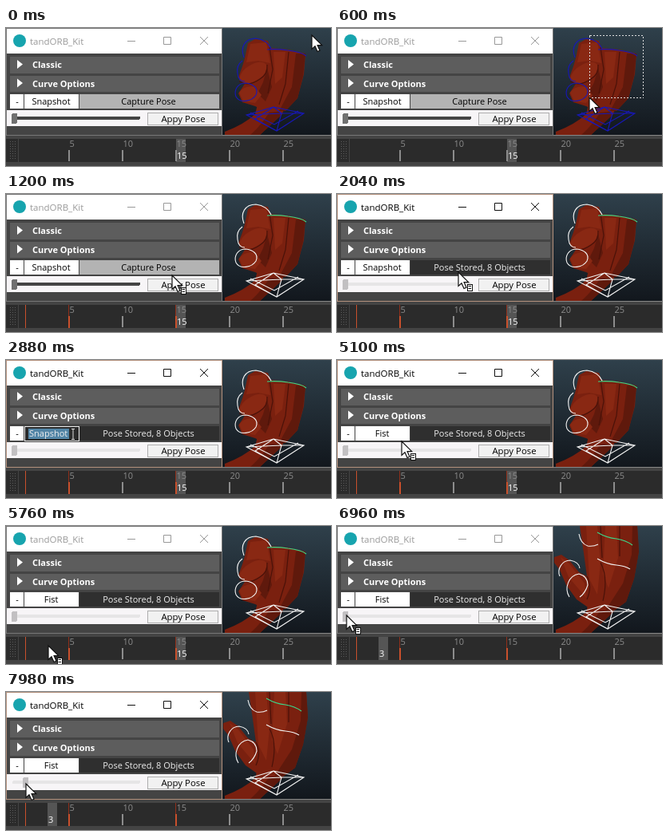
An HTML page that plays this animation: 407x173 px, repeating every 8 s.

```html
<!DOCTYPE html>
<html lang="en">
<head>
<meta charset="utf-8">
<style>
html, body { margin: 0; width: 100%; height: 100%; overflow: hidden; background: #444; }
svg { display: block; width: 407px; height: 173px; font: 11px "Open Sans", sans-serif; }
rect { shape-rendering: crispEdges; }
.mid { text-anchor: middle; }
.rig { fill: none; stroke: #1717b8; stroke-width: 1.1; }
.selected .rig { stroke: #f2f2f2; }
.selected .lead { stroke: #3ad88a; }
.skin { fill: #7a200f; }
.lit { fill: #892813; }
.shade { fill: #5f190c; }
.crease { fill: none; stroke: #4a1209; stroke-width: 1.2; }
</style>
</head>
<body>
<svg viewBox="0 0 407 173">
  <defs>
    <linearGradient id="sky" x2="0" y2="1"><stop stop-color="#2f404b"/><stop offset="1" stop-color="#12171d"/></linearGradient>
    <clipPath id="view"><rect x="271" width="136" height="134"/></clipPath>
  </defs>
  <rect width="407" height="173" fill="#444"/>
  <rect x="271" y="134" width="136" height="1" fill="#888"/>

  <g id="scene" clip-path="url(#view)">
    <rect x="271" width="136" height="134" fill="url(#sky)"/>
    <path class="skin" d="M316 92L312 108Q298 121 274 130V134H318L346 108L350 94Z"/>
    <path class="shade" d="M334 98L346 108L318 134H306Q324 118 334 98Z"/>
    <g id="fist">
      <path class="skin" d="M299 38L303 19L312 14L328 16L331 25L353 27L375 32L373 58L365 88L350 104L328 106L312 98L296 93L291 82L299 70L291 62L296 48Z"/>
      <path class="lit" d="M306 20L326 18L331 44L316 41L301 43ZM335 30L350 30L346 62L337 70Z"/>
      <path class="shade" d="M363 32L375 32L372 60L365 88L350 104L342 104L358 74ZM327 50L333 74L325 92L315 82L322 68Z"/>
      <path class="lit" d="M292 65Q293 53 307 46Q321 39 327 47Q328 58 316 64Q302 74 292 65Z"/>
      <path class="lit" d="M292 81Q299 71 312 74L320 84L312 94L297 92Z"/>
      <path class="crease" d="M292 67Q304 74 318 64Q328 58 327 46M330 24L334 52L328 82M354 30L350 70L342 96"/>
      <path class="rig" d="M298 37C293 24 299 13 313 13Q327 15 332 26M296 41Q288 47 290 57Q291 67 299 67M300 69C290 69 285 78 288 86C293 95 308 92 313 84C317 75 309 70 300 69"/>
      <path class="rig lead" d="M327 27Q340 26 353 28Q370 30 376 35"/>
    </g>
    <g id="open">
      <path class="skin" d="M304 0H376L378 32L372 66L362 95L347 106H320L300 92L287 74L279 55L272 46V39L281 36L291 43L303 58L313 63L309 34Z"/>
      <path class="lit" d="M312 0H326L330 46L326 86L316 66ZM336 0H350L352 40L340 78L333 60ZM280 39L290 46L310 72L312 90L290 64Z"/>
      <path class="shade" d="M370 0H376L378 32L372 66L362 95L347 106H336L358 72L369 36Z"/>
      <path class="crease" d="M330 0L332 40M354 0L354 38M313 63Q320 76 313 92M330 46Q340 64 333 94"/>
      <path class="rig" d="M303 10Q305 22 314 25Q321 26 327 23M279 63C275 54 282 43 292 43Q303 45 304 53M291 89C284 78 290 62 303 60Q314 63 314 74Q311 84 304 89M326 41Q338 48 350 49Q361 50 367 54"/>
      <path class="rig lead" d="M326 8Q338 15 350 16Q362 18 370 24"/>
    </g>
    <path class="rig" d="M301 109L335 99L373 107L339 129ZM301 109L345 107L373 107M335 99L312 114L339 129L345 107ZM306 106L336 121L366 104"/>
  </g>

  <rect id="border" width="271" height="135"/>
  <rect x="1" y="1" width="269" height="133" fill="#444"/>
  <rect x="1" y="1" width="269" height="31" fill="#fff"/>
  <circle cx="17" cy="16" r="8" fill="#17a4ae"/>
  <text id="title" x="30" y="21" font-size="11.500">tandORB_Kit</text>
  <path id="controls" d="M152 16.500H162M197.500 11.500H206.500V20.500H197.500ZM243 11L253 21M253 11L243 21" fill="none"/>
  <g fill="#5d5d5d"><rect x="5" y="36" width="262" height="21"/><rect x="5" y="60" width="262" height="20"/></g>
  <g fill="#fff" font-weight="700">
    <path d="M14 40L21 45.500L14 51ZM14 63.500L21 69L14 74.500Z"/>
    <text x="33" y="50">Classic</text>
    <text x="33" y="74">Curve Options</text>
  </g>
  <rect x="5" y="83" width="17" height="18" fill="#fff"/>
  <text class="mid" x="14" y="96">-</text>
  <rect id="field" x="23" y="83" width="68" height="18"/>
  <rect id="highlight" x="28" y="86" width="51" height="13" fill="#5285a6"/>
  <text id="name" y="96"></text>
  <rect id="caret" y="86" width="1" height="13" fill="#fff"/>
  <rect id="button" x="92" y="83" width="175" height="18"/>
  <text id="status" class="mid" x="178.500" y="96"></text>
  <rect x="1" y="103" width="269" height="20" fill="#f7f5f7"/>
  <rect id="track" x="8" y="111" width="160" height="4" rx="2"/>
  <rect id="handle" y="107" width="7" height="13" rx="2"/>
  <rect x="177.500" y="106.500" width="88" height="15" fill="#f1f1f1" stroke="#adadad"/>
  <text class="mid" x="222" y="118" font-size="11.400">Appy Pose</text>

  <rect y="139" width="407" height="29" fill="#2b2b2b"/>
  <path d="M5.500 142V166M8.500 142V166M11.500 142V166" stroke="#5c5c5c" stroke-dasharray="1 2"/>
  <rect x="15" y="139" width="1" height="29" fill="#444"/>
  <rect id="playhead" y="139" width="12" height="29" fill="#555"/>
  <g id="ticks" fill="#8c8c8c"></g>
  <g id="keys" fill="#c9502c"></g>
  <text id="current" y="164" fill="#fff"></text>

  <rect id="marquee" fill="none" stroke="#ddd" stroke-dasharray="2 2"/>
  <path id="beam" d="M82 86.500H86M84 87V99M82 99.500H86" stroke="#ddd" fill="none"/>
  <g id="cursor">
    <path d="M0 0V17.500L4 13.800L7 20.500L10 19.200L7.100 12.700H12.700Z" fill="#fff" stroke="#111" stroke-width="1.200"/>
    <g id="badge"><rect x="11" y="15" width="6" height="8" fill="#fff" stroke="#111"/><path d="M12.500 17.500H16M12.500 20.500H16" stroke="#111"/></g>
  </g>
</svg>
<script>
const LOOP = 8000, STEP = 60;
const $ = id => document.getElementById(id);
const set = (id, attrs) => { for (const k in attrs) $(id).setAttribute(k, attrs[k]); };
const show = (id, on) => set(id, { visibility: on ? "visible" : "hidden" });
const frameX = n => Math.floor(78 + (n - 5) * 13.4);

// Cursor stops: time, x, y
const path = [
  [0, 383, 9], [120, 383, 9], [840, 282, 126], [1200, 208, 102], [1440, 186, 93],
  [1740, 186, 93], [2040, 152, 98], [2460, 84, 93], [4140, 84, 93], [4200, 86, 92],
  [4980, 86, 92], [5700, 53, 150], [6240, 53, 150], [6960, 12, 112], [7080, 11, 112],
  [7260, 11, 112], [7980, 25, 115]
];
function cursorAt(t) {
  const i = path.findIndex(p => p[0] >= t);
  if (i < 1) return path[0].slice(1);
  const [a, b] = [path[i - 1], path[i]], k = (t - a[0]) / (b[0] - a[0]);
  return [1, 2].map(j => Math.round(a[j] + (b[j] - a[j]) * k));
}

for (const n of [5, 10, 15, 20, 25]) {
  $("ticks").innerHTML += `<rect x="${frameX(n)}" y="153" width="2" height="14"/>
    <text x="${frameX(n) + 1.5}" y="149">${n}</text>`;
}
for (const n of [1, 5, 15]) {
  const y = n === 1 ? 139 : 153;
  $("keys").innerHTML += `<rect x="${frameX(n)}" y="139" width="1" height="29" fill="#8f2f1b"/>
    <rect x="${frameX(n)}" y="${y}" width="${n === 1 ? 1 : 2}" height="${168 - y}"/>`;
}

function draw(t) {
  const [x, y] = cursorAt(t);
  const active = t >= 1740 && t < 5700 || t >= 7260;
  const stored = t >= 1740, editing = t >= 2580 && t < 4380, opened = t >= 5820;
  const typed = [3780, 3840, 3960, 4140].filter(k => t >= k).length;
  const arrow = t < 2460 || t >= 4200;

  $("scene").classList.toggle("selected", t >= 900);
  show("keys", t >= 900);
  show("fist", !opened);
  show("open", opened);

  set("border", { fill: active ? "#b3917d" : "#777" });
  set("title", { fill: active ? "#000" : "#999" });
  set("controls", { stroke: active ? "#111" : "#999" });
  set("field", { fill: editing ? "#2b2b2b" : "#fff", stroke: editing ? "#eee" : "none" });
  $("name").textContent = typed ? "Fist".slice(0, typed) : "Snapshot";
  set("name", {
    x: editing ? 29 : 56.5,
    fill: editing ? "#eee" : "#000",
    "text-anchor": editing ? "start" : "middle"
  });
  show("highlight", editing && t >= 2880 && !typed);
  show("caret", editing && (t < 2880 || typed));
  if (editing) set("caret", { x: Math.round(30 + $("name").getComputedTextLength()) });

  set("button", { fill: stored ? "#2f2f2f" : "#b3b3b3" });
  set("status", { fill: stored ? "#eee" : "#000" });
  $("status").textContent = stored ? "Pose Stored, 8 Objects" : "Capture Pose";
  set("track", { fill: stored ? "#e6e5e6" : "#444" });
  set("handle", { x: t >= 7260 ? x - 4 : 7, fill: stored ? "#c2c0c2" : "#707070" });

  const now = opened ? 3 : 15;
  set("playhead", { x: frameX(now) + 1 });
  set("current", { x: frameX(now) + 2 });
  $("current").textContent = now;

  show("marquee", t > 120 && t < 900);
  set("marquee", { x: x + .5, y: 9.5, width: 383 - x, height: Math.max(0, y - 9) });
  show("beam", !arrow && t < 3780);
  set("cursor", { transform: `translate(${x} ${y})`, display: arrow ? "inline" : "none" });
  show("badge", t >= 960 && t < 7260);
}

function tick() {
  const t = performance.now() % LOOP;
  draw(Math.floor(t / STEP) * STEP);
  requestAnimationFrame(tick);
}
tick();
</script>
</body>
</html>
```
